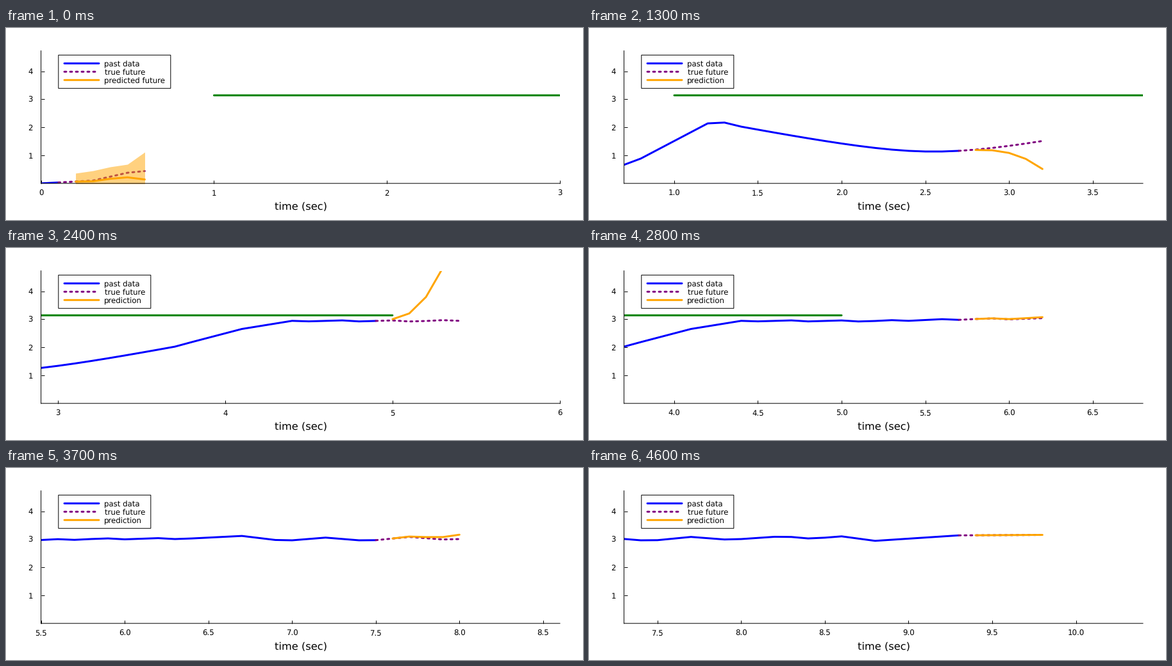
Recreate the animation shown at these times as a matplotlib script. Size 900 px wide and 300 px high, loop 4.7 s.

```python
import matplotlib.pyplot as plt
import numpy as np
from matplotlib.animation import FuncAnimation
from matplotlib.patches import Rectangle

W, H, DPI = 900, 300, 100
PX = 72 / DPI  # points per pixel
STEPS, SWITCH = 47, 10  # from SWITCH on the window scrolls and the band is gone
LEFT, RIGHT, TOP, BOTTOM, UNIT = 54.6, 864, 35.6, 242.8, 43.8
DASH = (0, (1, 2))

plt.rcParams.update({
    "font.family": "DejaVu Sans", "font.size": 11.7 * PX,
    "text.hinting": "none", "path.snap": False, "lines.linewidth": 3 * PX,
    "lines.solid_capstyle": "round", "lines.dash_capstyle": "round",
    "lines.solid_joinstyle": "round",
})

# Turning points (time, angle) of the swing-up and of the balancing
KEYS = [
    (0, 0), (0.3, 0.1), (0.5, 0.38), (0.6, 0.44), (0.8, 0.885), (1.2, 2.14),
    (1.3, 2.17), (1.4, 2.03), (3.7, 2.03), (4.1, 2.655), (4.4, 2.945),
    (5.2, 2.94), (5.8, 3.01), (6.4, 3.03), (6.7, 3.12), (6.95, 2.94),
    (7.2, 3.06), (7.45, 2.94), (7.7, 3.085), (7.93, 2.98), (8.25, 3.11),
    (8.42, 3.02), (8.6, 3.105), (8.8, 2.945), (9.3, 3.14), (9.8, 3.157),
]
# Moments (step, size) at which the forecast drifts off
DRIFTS = [(0, -0.3), (6, 2.35), (13, -1), (18, 0.6), (24, 3.4),
          (33, 0.3), (37, 0.15), (41, 0.25)]

SAMPLE = np.arange(99)
TIME = SAMPLE / 10
AHEAD = np.arange(1, 6) / 5


def true_angle():
    angle = np.interp(TIME, *zip(*KEYS))
    swing = 1.135 + 0.59 * (np.hypot(1, 2 * (TIME - 2.55)) - 1)
    angle = np.where((TIME > 1.35) & (TIME < 3.75), swing, angle)
    ripple = 0.018 * (SAMPLE % 3 - 1)
    return angle + np.where((TIME > 4.45) & (TIME < 6.35), ripple, 0)


ANGLE = true_angle()


def drift(k):
    size = sum(a * np.exp(-(k - c) ** 2 / 3.5) for c, a in DRIFTS)
    return size * AHEAD ** 2.7


def spread(k):
    unsure = 0.5 ** k * (0.3 + 0.6 * AHEAD ** 12)
    return unsure + 0.13 * np.sin(np.pi * (AHEAD - 0.2))


fig = plt.figure(figsize=(W / DPI, H / DPI), dpi=DPI, facecolor="white")
ax = fig.add_axes([LEFT / W, 1 - BOTTOM / H, (RIGHT - LEFT) / W, (BOTTOM - TOP) / H])
ax.set_ylim(0, (BOTTOM - TOP) / UNIT)
ax.set_yticks([1, 2, 3, 4])
ax.spines[["top", "right"]].set_visible(False)
ax.spines[["left", "bottom"]].set_linewidth(PX)
ax.tick_params(direction="in", length=5 * PX, width=PX)
ax.tick_params(axis="x", pad=9.8 * PX)
ax.tick_params(axis="y", pad=12.6 * PX)

past, = ax.plot([], [], color="blue", zorder=2)
future, = ax.plot([], [], color="purple", ls=DASH, zorder=2.1)
band = ax.fill_between([], [], [])
guess, = ax.plot([], [], color="orange", zorder=2.3)
ax.plot([1, 5], [np.pi, np.pi], color="green", zorder=2.4)

# Overlay in pixel units for the legend and the axis title
ui = fig.add_axes([0, 0, 1, 1], xlim=(0, W), ylim=(H, 0))
ui.axis("off")
box = ui.add_patch(Rectangle((81.8, 42.3), 175, 52, fc="white", ec="black", lw=PX))


def legend_row(y, color, style, x, label=""):
    ui.plot([91, 145], [y, y], color=color, ls=style)
    return ui.text(x, y + 4.4, label, va="baseline")


legend_row(55.3, "blue", "-", 152.6, "past data")
legend_row(68.3, "purple", DASH, 153.5, "true future")
name = legend_row(81.3, "orange", "-", 152.6)
ui.text(460, 284, "time (sec)", ha="center", va="baseline", fontsize=16.2 * PX)


def ticks(lo, hi, step):
    first = np.ceil(lo / step - 1e-6) + 0.0
    return np.arange(first, hi / step + 1e-6) * step


def set_window(now):
    lo, hi = max(0, now - 2), max(3, now + 1.1)
    marks, digits = ticks(lo, hi, 1), 0
    if len(marks) < 4:
        marks, digits = ticks(lo, hi, 0.5), 1
    ax.set_xticks(marks, [f"{v:.{digits}f}" for v in marks])
    ax.set_xlim(lo, hi)


def draw(k):
    global band
    n = 1 + 2 * k
    ahead = slice(n + 1, n + 6)
    t, mean, width = TIME[ahead], ANGLE[ahead] + drift(k), spread(k)
    early = k < SWITCH

    past.set_data(TIME[:n + 1], ANGLE[:n + 1])
    future.set_data(TIME[n:n + 6], ANGLE[n:n + 6])
    guess.set_data(t, mean)
    band.remove()
    band = ax.fill_between(t, mean - width, mean + width, color="orange",
                           alpha=0.5, lw=0, zorder=2.2, visible=early)

    name.set_text("predicted future" if early else "prediction")
    box.set_width(175 if early else 144)
    set_window(TIME[n])


anim = FuncAnimation(fig, draw, frames=STEPS, interval=100, init_func=lambda: None,
                     repeat=True, repeat_delay=0, blit=False)
plt.show()
```
